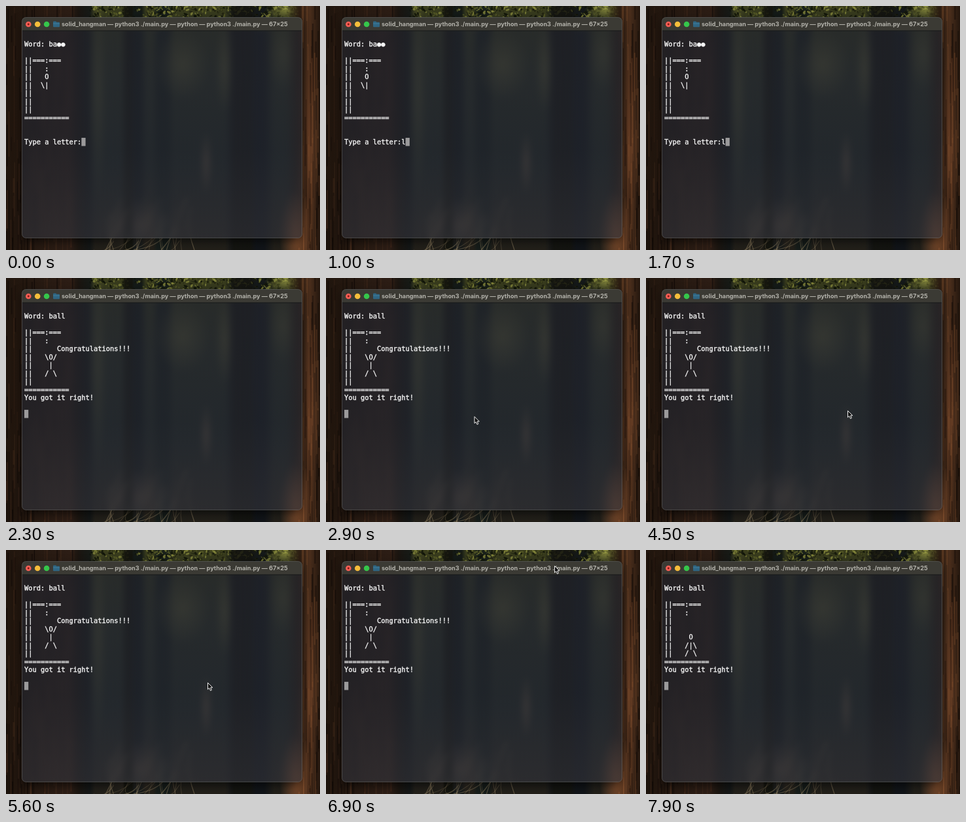
Write an HTML page with a canvas that moves like this. It is 480x374 px and loops after 8000 ms.

```html
<!DOCTYPE html>
<html lang="en">
<head>
<meta charset="utf-8">
<title>Hangman in a terminal</title>
<style>
  html, body { margin: 0; height: 100%; overflow: hidden; background: #1c140e; }
  canvas { display: block; }
</style>
</head>
<body>
<canvas id="stage" width="480" height="374"></canvas>
<script>
const W = 480, H = 374, LOOP = 8000;
const CELL = 6.24, LINE = 12.55, LEFT = 28, TOP = 45.5;
const WIN = { x: 24.5, y: 17.5, w: 428, h: 338, bar: 21 };
const TITLE = 'solid_hangman — python3 ./main.py — python — python3 ./main.py — 67×25';

const stage = document.getElementById('stage').getContext('2d');

let seed = 7;
const random = () => (seed = (seed * 16807) % 2147483647) / 2147483647;
const between = (a, b) => a + (b - a) * random();

function layer(paint) {
  const canvas = document.createElement('canvas');
  canvas.width = W;
  canvas.height = H;
  paint(canvas.getContext('2d'));
  return canvas;
}

function gradient(g, x0, y0, x1, y1, ...stops) {
  const fill = g.createLinearGradient(x0, y0, x1, y1);
  stops.forEach(([at, color]) => fill.addColorStop(at, color));
  return fill;
}

function disc(g, x, y, r, color) {
  g.fillStyle = color;
  g.beginPath();
  g.arc(x, y, r, 0, 7);
  g.fill();
}

// soft elliptical glow, rgb as 'r,g,b'
function glow(g, x, y, rx, ry, rgb, alpha) {
  g.save();
  g.translate(x, y);
  g.scale(rx, ry);
  const fill = g.createRadialGradient(0, 0, 0, 0, 0, 1);
  fill.addColorStop(0, `rgba(${rgb},${alpha})`);
  fill.addColorStop(1, `rgba(${rgb},0)`);
  disc(g, 0, 0, 1, fill);
  g.restore();
}

function trunk(g, x, w, rgb) {
  const shade = alpha => `rgba(${rgb},${alpha})`;
  g.fillStyle = gradient(g, x, 0, x + w, 0, [0, shade(0)], [.2, shade(.85)], [.8, shade(.85)], [1, shade(0)]);
  g.fillRect(x, 0, w, H);
}

function bark(g, x, w, count, light) {
  for (let i = 0; i < count; i++) {
    g.fillStyle = i % 2 ? light : 'rgba(6,4,3,.35)';
    g.fillRect(x + random() * w, between(-40, H), between(.7, 2.5), between(20, 110));
  }
}

const forest = layer(g => {
  g.fillStyle = gradient(g, 0, 0, 0, H,
    [0, '#3a3d1c'], [.06, '#33371f'], [.3, '#2b3226'], [.65, '#202824'], [1, '#221f19']);
  g.fillRect(0, 0, W, H);
  trunk(g, 98, 38, '17,21,22');
  trunk(g, 180, 34, '14,20,22');
  trunk(g, 225, 30, '20,28,26');
  trunk(g, 335, 75, '14,18,24');

  const LEAF = '122,118,70', DRY = '128,104,82';
  glow(g, 140, 130, 14, 170, LEAF, .4);
  glow(g, 270, 90, 42, 55, LEAF, .5);
  glow(g, 335, 95, 16, 70, LEAF, .5);
  glow(g, 306, 240, 10, 50, DRY, .6);
  glow(g, 425, 75, 24, 55, LEAF, .4);
  glow(g, 200, 335, 55, 40, DRY, .4);

  // sunlit leaves along the top
  const leaves = ['rgba(138,140,62,.75)', 'rgba(88,92,38,.7)', 'rgba(14,17,8,.8)', 'rgba(30,32,16,.7)'];
  for (let i = 0; i < 700; i++) {
    g.fillStyle = leaves[i % 4];
    g.beginPath();
    g.ellipse(between(128, 452), random() ** 1.3 * 34, between(.6, 3.5), between(.5, 2), random() * 3, 0, 7);
    g.fill();
  }
  trunk(g, 340, 42, '20,20,15');
  trunk(g, 178, 18, '20,20,13');
  glow(g, 428, 7, 26, 14, '176,178,80', .5);

  // dry twigs on the forest floor
  g.strokeStyle = 'rgba(150,132,100,.45)';
  for (let i = 0; i < 26; i++) {
    const x = between(150, 290), y = between(290, 362);
    g.lineWidth = between(.5, 1.5);
    g.beginPath();
    g.moveTo(x, y);
    g.quadraticCurveTo(x - 12, y + 20, x + between(-50, 5), H);
    g.stroke();
  }

  g.fillStyle = gradient(g, 0, 0, 130, 0, [0, '#20150d'], [.75, '#2c1d15'], [.85, '#1b1510'], [1, 'rgba(22,20,16,0)']);
  g.fillRect(0, 0, 130, H);
  bark(g, 0, 105, 130, 'rgba(78,50,32,.35)');
  g.fillStyle = gradient(g, 428, 0, W, 0, [0, 'rgba(36,24,15,0)'], [.4, '#2c1d12'], [.7, '#4a2e1c'], [1, '#24170e']);
  g.fillRect(428, 0, 52, H);
  bark(g, 446, 34, 70, 'rgba(120,74,44,.35)');
  glow(g, 464, 210, 12, 160, '150,88,52', .4);
  glow(g, 444, 350, 26, 70, '190,112,64', .6);
});

const backdrop = layer(g => {
  const { x, y, w, h, bar } = WIN;
  const frame = () => { g.beginPath(); g.roundRect(x, y, w, h, 6); };
  g.drawImage(forest, 0, 0);

  g.save();
  g.shadowColor = 'rgba(0,0,0,.6)';
  g.shadowBlur = 14;
  g.shadowOffsetY = 5;
  g.fillStyle = '#22242c';
  frame();
  g.fill();
  g.restore();

  g.save();
  frame();
  g.clip();
  g.filter = 'blur(4px)';
  g.drawImage(forest, 0, 0);
  g.filter = 'none';
  g.fillStyle = gradient(g, 0, y, 0, y + h, [0, 'rgba(35,37,46,.66)'], [.6, 'rgba(36,39,48,.66)'], [1, 'rgba(48,49,56,.68)']);
  g.fillRect(x, y, w, h);
  g.fillStyle = '#3b3a34';
  g.fillRect(x, y, w, bar - 1);
  g.fillStyle = '#191a1b';
  g.fillRect(x, y + bar - 1, w, 1);
  g.restore();

  g.strokeStyle = 'rgba(110,112,112,.5)';
  g.lineWidth = 1;
  frame();
  g.stroke();

  ['#f45d54', '#f6bd3b', '#35c64b'].forEach((color, i) => disc(g, 34.3 + i * 13.9, 28, 4.3, color));
  disc(g, 34.3, 28, 1.4, '#7c1711');

  g.fillStyle = '#2f6683';
  g.beginPath();
  g.roundRect(72, 23.5, 5, 4, 1);
  g.roundRect(72, 24.8, 10, 7.4, 1);
  g.fill();
  g.fillStyle = '#427d99';
  g.fillRect(72, 26.5, 10, 1);

  g.font = '700 9.12px Inter, sans-serif';
  g.textBaseline = 'middle';
  g.fillStyle = '#b3b2ab';
  g.fillText(TITLE, 85, 28.3);
});

const gallows = (word, body, ...rest) =>
  ['', 'Word: ' + word, '', '||===:===', '||   :', ...body.map(s => '||' + s), '===========', ...rest];

const guessing = typed =>
  gallows('ba●●', ['   O', '  \\|', '', '', ''], '', '', 'Type a letter:' + typed);
const won = body => gallows('ball', body, 'You got it right!', '', '');
const jump = won(['      Congratulations!!!', '   \\O/', '    |', '   / \\', '']);
const land = won(['', '', '    O', '   /|\\', '   / \\']);

const TYPED = 800, WON = 2240, POSE = 325;

function screenAt(t) {
  if (t < WON) return guessing(t < TYPED ? '' : 'l');
  return Math.floor((t - WON) / POSE) % 2 ? land : jump;
}

function drawScreen(lines) {
  stage.font = "10.37px 'DejaVu Sans Mono', monospace";
  stage.textBaseline = 'alphabetic';
  stage.fillStyle = stage.strokeStyle = '#f6f6f6';
  stage.lineWidth = .35;
  lines.forEach((line, row) => {
    const y = TOP + row * LINE + 3.8;
    stage.fillText(line, LEFT, y);
    stage.strokeText(line, LEFT, y);
  });
  const last = lines.length - 1;
  stage.fillStyle = '#9b9a9b';
  stage.fillRect(LEFT + lines[last].length * CELL, TOP + last * LINE - 6.6, CELL, LINE);
}

// [time, x, y] of the pointer tip
const POINTER = [
  [2700, 222, 216], [2900, 227, 212.5], [3400, 308.5, 203.5],
  [6450, 308.5, 203.5], [6900, 349.5, 24.5], [7100, 356, -16]
];

function drawPointer(t) {
  const i = POINTER.findIndex(p => p[0] > t);
  if (i < 1) return;
  const [t0, x0, y0] = POINTER[i - 1], [t1, x1, y1] = POINTER[i];
  const u = (t - t0) / (t1 - t0), k = u * u * (3 - 2 * u);
  stage.save();
  stage.translate(x0 + (x1 - x0) * k, y0 + (y1 - y0) * k);
  stage.fillStyle = '#0b0b0b';
  stage.strokeStyle = '#f2f2f2';
  stage.lineWidth = 1;
  const shape = new Path2D('M0 0V10.2L2.3 8.1L4 12L5.8 11.2L4.2 7.4H7.3Z');
  stage.fill(shape);
  stage.stroke(shape);
  stage.restore();
}

function draw(now) {
  const t = now % LOOP;
  stage.drawImage(backdrop, 0, 0);
  drawScreen(screenAt(t));
  drawPointer(t);
}

const start = performance.now();
function tick() {
  draw(performance.now() - start);
  requestAnimationFrame(tick);
}
tick();
</script>
</body>
</html>
```
